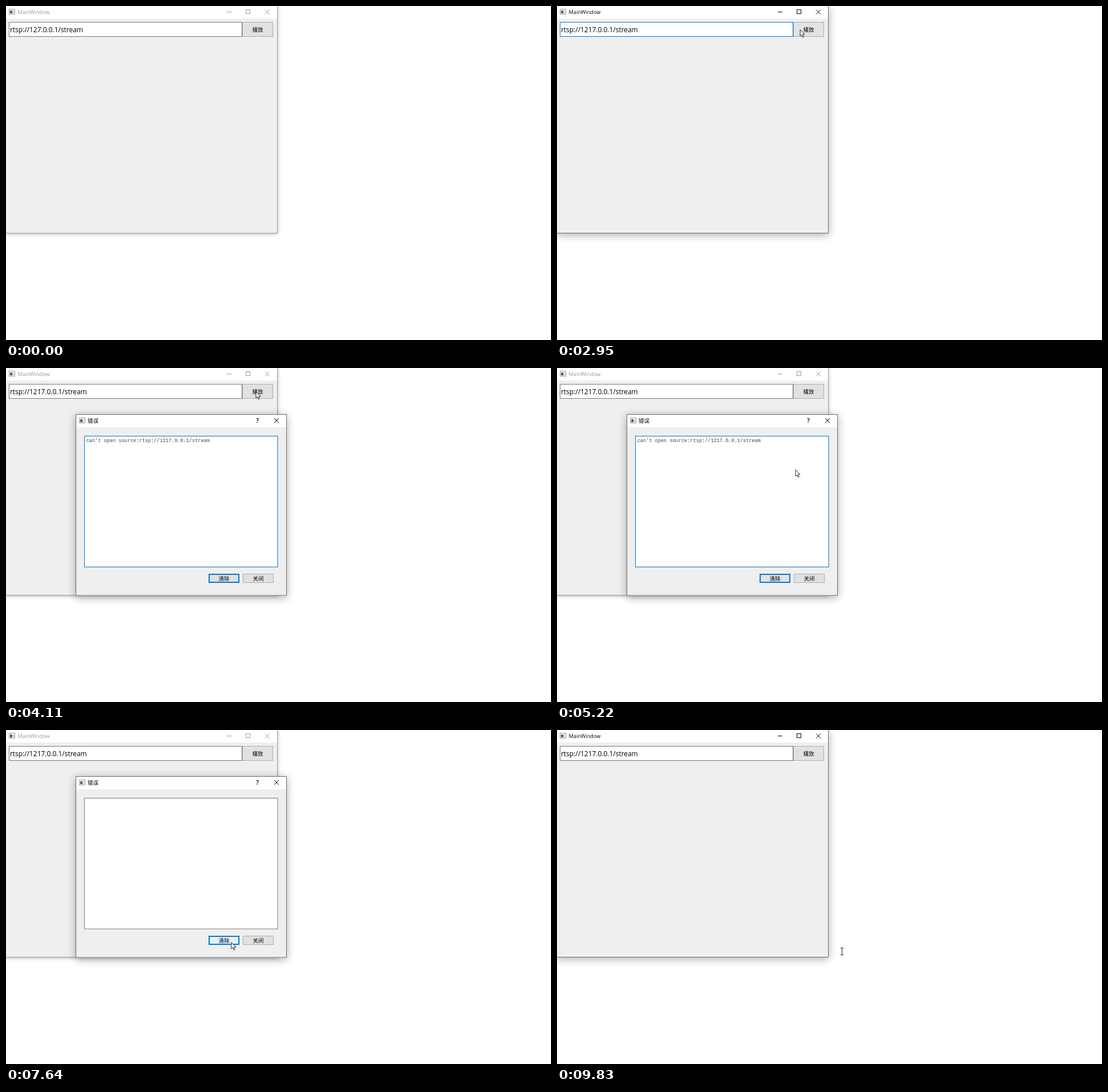
An HTML page with a canvas that plays this animation: 955 by 586 pixels, repeating every 9.9 s.

```html
<!DOCTYPE html>
<html lang="zh">
<head>
<meta charset="utf-8">
<style>
  html, body { margin: 0; width: 100%; height: 100%; overflow: hidden; background: #fff; }
  canvas { display: block; }
</style>
</head>
<body>
<canvas id="stage" width="955" height="586"></canvas>
<script>
const ctx = document.getElementById('stage').getContext('2d');
const LOOP = 9900;
const LATIN = '"Open Sans", "Noto Sans", sans-serif';
const CJK = '500 9.5px "Noto Sans CJK SC", "Noto Sans CJK", sans-serif';
const MONO = '8.58px "Liberation Mono", monospace';
const BLUE = '#0078d7', GREY = '#7a7a7a';

// Moments of the story, in ms
const APPEAR = 70, FOCUS = 1840, TYPE = 2370, PLAY = 3420, OPEN = 3675, CLEAR = 6760, CLOSE = 8330;
const RETURN = CLOSE + 110, GONE = CLOSE + 290;
const BLINK = 530, PRESS_TIME = 120, FADE_TIME = 300;

const address = { x: 5, y: 28, w: 409, h: 26 };
const playButton = { x: 414, y: 28, w: 54, h: 26 };
const frame = { x: 122, y: 81, w: 370, h: 318.5 };
const log = { x: 137, y: 119, w: 339.5, h: 230.5 };
const clearButton = { x: 355, y: 361, w: 54, h: 16 };
const closeButton = { x: 415, y: 361, w: 54, h: 16 };

// Each stroke moves the pointer on to a new place
const home = { x: 896, y: 576 };
const strokes = [
  { from: APPEAR, to: 350, x: 252, y: 143 },
  { from: 550, to: 1440, x: 59, y: 44 },
  { from: TYPE, to: 3020, x: 437.5, y: 41 },
  { from: 4390, to: 4460, x: 433, y: 47 },
  { from: 4800, to: 5640, x: 402, y: 308 },
  { from: 5710, to: 6250, x: 424, y: 364 },
  { from: 6390, to: 6620, x: 394, y: 372 },
  { from: 7600, to: 8260, x: 430, y: 373 },
  { from: 9020, to: 9160, x: 430, y: 368 },
  { from: 9700, to: 9830, x: 499.5, y: 388 }
];

const ramp = (t, a, b) => Math.min(1, Math.max(0, (t - a) / (b - a)));
const smooth = p => p * p * (3 - 2 * p);
const within = (t, a, b) => t >= a && t < b;
const inside = (p, r) => within(p.x, r.x, r.x + r.w) && within(p.y, r.y, r.y + r.h);
const pressed = t => [FOCUS, PLAY, CLEAR, CLOSE].some(c => within(t, c, c + PRESS_TIME));

function pointerAt(t) {
  let { x, y } = home;
  for (const s of strokes) {
    const p = smooth(ramp(t, s.from, s.to));
    x += (s.x - x) * p;
    y += (s.y - y) * p;
  }
  return { x, y };
}

// Share of the last moments in which a state held: a linear fade in and out
function recent(t, state) {
  const samples = 20;
  let held = 0;
  for (let i = 0; i < samples; i++) held += state(t - i / samples * FADE_TIME);
  return held / samples;
}

function faded(alpha, draw) {
  if (alpha <= 0) return;
  ctx.save();
  ctx.globalAlpha *= alpha;
  draw();
  ctx.restore();
}

function box({ x, y, w, h }, fill, border, line = 1) {
  ctx.fillStyle = fill;
  ctx.fillRect(x, y, w, h);
  ctx.strokeStyle = border;
  ctx.lineWidth = line;
  ctx.strokeRect(x + line / 2, y + line / 2, w - line, h - line);
}

function text(str, x, y, font, color, align = 'left') {
  ctx.font = font;
  ctx.fillStyle = color;
  ctx.textAlign = align;
  ctx.fillText(str, x, y);
}

function lines(color, ...segments) {
  ctx.strokeStyle = color;
  ctx.lineWidth = 1;
  ctx.beginPath();
  for (const [x1, y1, x2, y2] of segments) {
    ctx.moveTo(x1, y1);
    ctx.lineTo(x2, y2);
  }
  ctx.stroke();
}

function button(t, rect, label, enabled, focus = false) {
  const over = s => enabled(s) && inside(pointerAt(s), rect);
  const hover = recent(t, over);
  const press = Math.min(1, 2 * recent(t, s => over(s) && pressed(s)));
  box(rect, '#e1e1e1', focus ? BLUE : '#adadad', focus ? 2 : 1);
  faded(hover, () => box(rect, '#e5f1fb', BLUE, focus ? 2 : 1));
  faded(press, () => box(rect, '#cce4f7', '#005499'));
  text(label, rect.x + rect.w / 2, rect.y + rect.h / 2 + 3.6, CJK, '#000', 'center');
}

function shadow({ x, y, w, h }, active) {
  ctx.save();
  ctx.beginPath();
  ctx.rect(-50, -50, 1100, 700);
  ctx.rect(x, y, w, h);
  ctx.clip('evenodd');
  ctx.shadowColor = 'rgba(0,0,0,.32)';
  ctx.shadowBlur = active ? 14 : 6;
  ctx.shadowOffsetY = active ? 3 : 1;
  ctx.fillStyle = '#efefef';
  ctx.fillRect(x, y, w, h);
  ctx.restore();
}

function windowFrame(rect, active) {
  shadow(rect, active);
  box(rect, '#efefef', active ? '#6b6b6b' : '#a2a2a2');
  ctx.fillStyle = '#fff';
  ctx.fillRect(rect.x + 1, rect.y + 1, rect.w - 2, 22);
}

function windowIcon(x, y) {
  box({ x, y, w: 11, h: 10 }, '#f4f6f8', '#98a0a8');
  ctx.fillStyle = '#3d5f80';
  ctx.fillRect(x + 2, y + 3, 4, 5);
  ctx.fillStyle = '#c3ccd4';
  ctx.fillRect(x + 7, y + 3, 2, 5);
}

function closeGlyph(x, y, color) {
  lines(color, [x, y, x + 8, y + 8], [x + 8, y, x, y + 8]);
}

function mainWindow(t) {
  const active = within(t, FOCUS, OPEN) || t >= RETURN;
  const color = active ? '#000' : '#999';
  windowFrame({ x: -1, y: -1, w: 477, h: 400 }, active);
  windowIcon(5, 5);
  text('MainWindow', 20.5, 14, '9.2px ' + LATIN, color);
  lines(color, [387, 10.5, 395, 10.5]);
  ctx.strokeRect(420.5, 6.5, 7, 7);
  closeGlyph(454, 6.5, color);

  const hover = recent(t, s => s < FOCUS + 60 && inside(pointerAt(s), address));
  const focus = recent(t, s => within(s, FOCUS + 60, PLAY));
  box(address, '#fff', GREY);
  faded(hover, () => box(address, '#fff', '#171717'));
  faded(focus, () => box(address, '#fff', BLUE));

  const head = 'rtsp://12' + (t >= TYPE ? '1' : '');
  text(head + '7.0.0.1/stream', 7, 46.2, '11.95px ' + LATIN, '#000');
  if (within(t, FOCUS, TYPE + BLINK)) {
    const caret = Math.round(7 + ctx.measureText(head).width) + 0.5;
    lines('#000', [caret, 34, caret, 49]);
  }
  button(t, playButton, '播放', s => s < OPEN);
}

function dialog(t) {
  if (!within(t, OPEN, GONE)) return;
  const opening = 1 - (1 - ramp(t, OPEN, OPEN + 270)) ** 3;
  const closing = ramp(t, RETURN + 40, GONE);
  const scale = 0.95 + 0.05 * (opening - closing);
  const cx = frame.x + frame.w / 2, cy = frame.y + frame.h / 2;
  const live = t < RETURN;
  const open = s => s >= OPEN;

  ctx.save();
  ctx.globalAlpha = opening * (1 - closing);
  ctx.translate(cx, cy);
  ctx.scale(scale, scale);
  ctx.translate(-cx, -cy);
  windowFrame(frame, live);
  windowIcon(128, 87);
  text('错误', 143, 95.8, CJK, '#000');
  if (live) {
    text('?', 440.5, 96.3, '600 11px ' + LATIN, '#000', 'center');
    closeGlyph(470, 88, '#000');
  }
  box(log, '#fff', GREY);
  faded(recent(t, s => s < CLEAR), () => box(log, '#fff', BLUE));
  if (t < CLEAR) text("can't open source:rtsp://1217.0.0.1/stream", 140.7, 130.4, MONO, '#444');
  button(t, clearButton, '清除', open, t < CLOSE);
  button(t, closeButton, '关闭', open);
  ctx.restore();
}

function pointer(t) {
  if (t < APPEAR) return;
  const p = pointerAt(t);
  ctx.save();
  ctx.translate(p.x, p.y);
  if (pressed(t)) {
    ctx.fillStyle = 'rgba(250,238,50,.72)';
    ctx.beginPath();
    ctx.arc(-0.5, 0, 7.5, 0, 2 * Math.PI);
    ctx.fill();
  }
  if (inside(p, address) || p.x > 476 || p.y > 399) {
    lines('#222', [0, -5.5, 0, 6.5], [-2.5, -5.5, 2.5, -5.5], [-2.5, 6.5, 2.5, 6.5]);
  } else {
    const arrow = new Path2D('M.5 .5V12L3.2 9.5L5 13.8L6.8 13L5 8.8H8.6Z');
    ctx.fillStyle = '#fff';
    ctx.strokeStyle = '#111';
    ctx.lineWidth = 0.9;
    ctx.fill(arrow);
    ctx.stroke(arrow);
  }
  ctx.restore();
}

const start = performance.now();
function render() {
  const t = (performance.now() - start) % LOOP;
  ctx.fillStyle = '#fff';
  ctx.fillRect(0, 0, 955, 586);
  mainWindow(t);
  dialog(t);
  pointer(t);
  requestAnimationFrame(render);
}
render();
</script>
</body>
</html>
```
